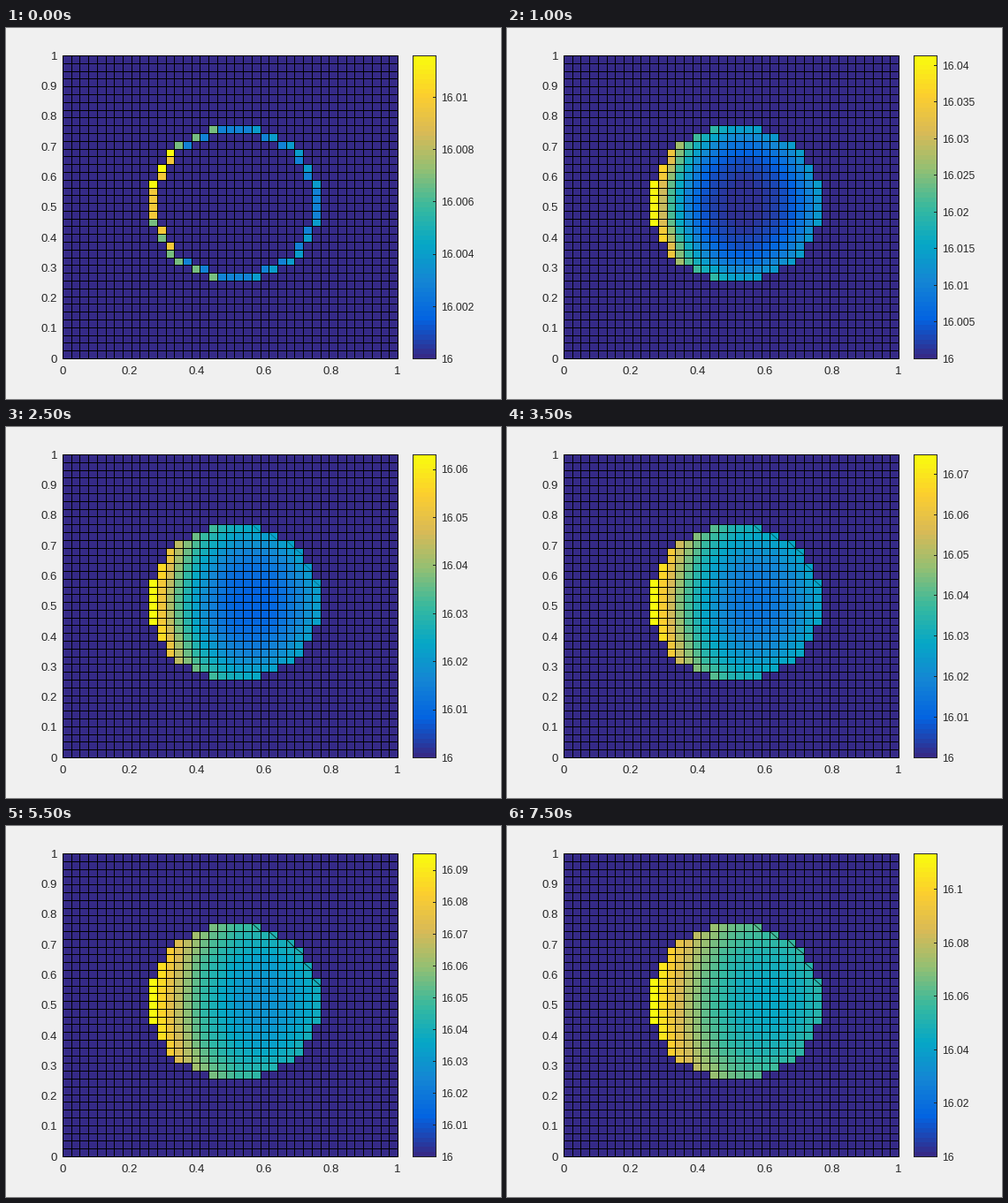
Animation, 560 px wide and 420 px high, one loop 8000 ms. Source, as a matplotlib script:

```python
import numpy as np
import matplotlib.pyplot as plt
from matplotlib.animation import FuncAnimation
from matplotlib.colors import LinearSegmentedColormap
from matplotlib.patches import Rectangle

W, H, DPI = 560, 420, 100
PX = 72 / DPI                       # one pixel in points
N = 39                              # cells per side
LEFT, RIGHT, TOP, BOTTOM = 64, 443, 31, 374
BAR_L, BAR_R = 460, 486
FRAMES, INTERVAL = 16, 500
BASE = 16
INK = "#262626"
CMAP = LinearSegmentedColormap.from_list("heat", [
    "#352a87", "#0363e1", "#1485d4", "#06a7c6", "#38b99e",
    "#92bf73", "#d9ba56", "#fcce2e", "#f9fb0e"], N=64)

# Disc on the grid and its exposed faces
dj, di = np.mgrid[0:N, 0:N] - 19.5
disc = di**2 + dj**2 <= 100
SIDES = [(1, 1), (-1, 1), (1, 0), (-1, 0)]      # step, axis
out_l, out_r, out_b, out_t = [disc & ~np.roll(disc, *s) for s in SIDES]
rim = out_l | out_r | out_b | out_t
corner = (out_l | out_r) & (out_b | out_t)
west = out_l & (np.abs(di) > np.abs(dj))


def rim_flux(west_corner, hot=3.5):
    """Heat per step: strong on left faces, weak on all others."""
    q = np.where(rim, 1.0, 0.0)
    q[corner] = 2**.5
    q[out_l] = hot
    q[out_l & corner] = hot / 2**.5
    q[west & corner & west_corner] = 1.2 * hot
    return q


def diffuse(u, flux, steps, rate=.175):
    for _ in range(steps):
        gain = sum(np.roll(disc, *s) * (np.roll(u, *s) - u) for s in SIDES)
        u = u + disc * rate * gain + flux
    return u


def build_fields():
    first = rim_flux(dj > 0)
    flux = np.minimum(rim_flux(disc), 3.6)
    fields = [first / first.max()]
    u = np.zeros((N, N))
    for k in range(1, FRAMES):
        u = diffuse(u, flux, 26 if k == 1 else 21)
        fields.append(u / u.max())
    return fields


def peak_at(k):
    """Hottest cell above BASE: square-root rise, then a steady climb."""
    return .0203 * np.sqrt(k + .015) + .0017 * k + .0091


def tick_step(peak):
    return next(m * 10**e for e in (-3, -2) for m in (1, 2, 5)
                if peak <= 10.1 * m * 10**e)


FIELDS = build_fields()

plt.rcParams["font.family"] = "Liberation Sans"
fig = plt.figure(figsize=(W / DPI, H / DPI), dpi=DPI, facecolor="#f0f0f0")
ax = fig.add_axes([0, 0, 1, 1])
ax.set_xlim(0, W)
ax.set_ylim(H, 0)
ax.axis("off")

xe = np.round(np.linspace(LEFT, RIGHT, N + 1))
ye = np.round(np.linspace(BOTTOM, TOP, N + 1))
mesh = ax.pcolormesh(xe, ye, FIELDS[0], cmap=CMAP, vmin=0, vmax=1,
                     antialiased=False)
grid = dict(colors="black", linewidth=PX, antialiased=False)
ax.vlines(xe, TOP, BOTTOM, **grid)
ax.hlines(ye, LEFT, RIGHT, **grid)

# Folded edges on the upper-right steps of the disc
folds = [ax.plot(xe[[i, i + 1]], ye[[j + 1, j]], color="black", lw=.6)[0]
         for j, i in np.argwhere(out_r & out_t)]


def label(x, y, s, size=9.5, ha="center"):
    return ax.text(x, y, s, fontsize=size, color=INK, ha=ha, va="center")


def level(v):
    return BOTTOM - v * (BOTTOM - TOP)


DROP = 1.8                          # labels sit just below their tick
for v in np.linspace(0, 1, 6):
    label(LEFT + v * (RIGHT - LEFT), 389.3, f"{v:g}")
for v in np.linspace(0, 1, 11):
    label(58, level(v) + DROP, f"{v:.1g}", ha="right")

# Colour bar
ax.pcolormesh([BAR_L, BAR_R], level(np.linspace(0, 1, 65)),
              np.arange(64)[:, None], cmap=CMAP, antialiased=False)
ax.add_patch(Rectangle((BAR_L, TOP), BAR_R - BAR_L, BOTTOM - TOP,
                       fill=False, ec=INK, lw=PX, antialiased=False))
marks = [ax.plot([BAR_R - 3, BAR_R], [0, 0], color=INK, lw=PX,
                 antialiased=False)[0] for _ in range(11)]
names = [label(492, 0, "", 8.7, "left") for _ in range(11)]


def update(k):
    peak = peak_at(k)
    step = tick_step(peak)
    mesh.set_array(FIELDS[k])
    for fold in folds:
        fold.set_alpha(np.clip((k - 2) / 10, 0, .8))
    for n, (mark, name) in enumerate(zip(marks, names)):
        shown = n * step <= peak
        mark.set_visible(shown)
        name.set_visible(shown)
        y = level(n * step / peak)
        mark.set_ydata([y, y])
        name.set_y(y + DROP)
        name.set_text(f"{BASE + n * step:.6g}")
    return [mesh, *folds, *marks, *names]


anim = FuncAnimation(fig, update, frames=FRAMES, interval=INTERVAL,
                     repeat=True, repeat_delay=0, blit=False)
plt.show()
```
